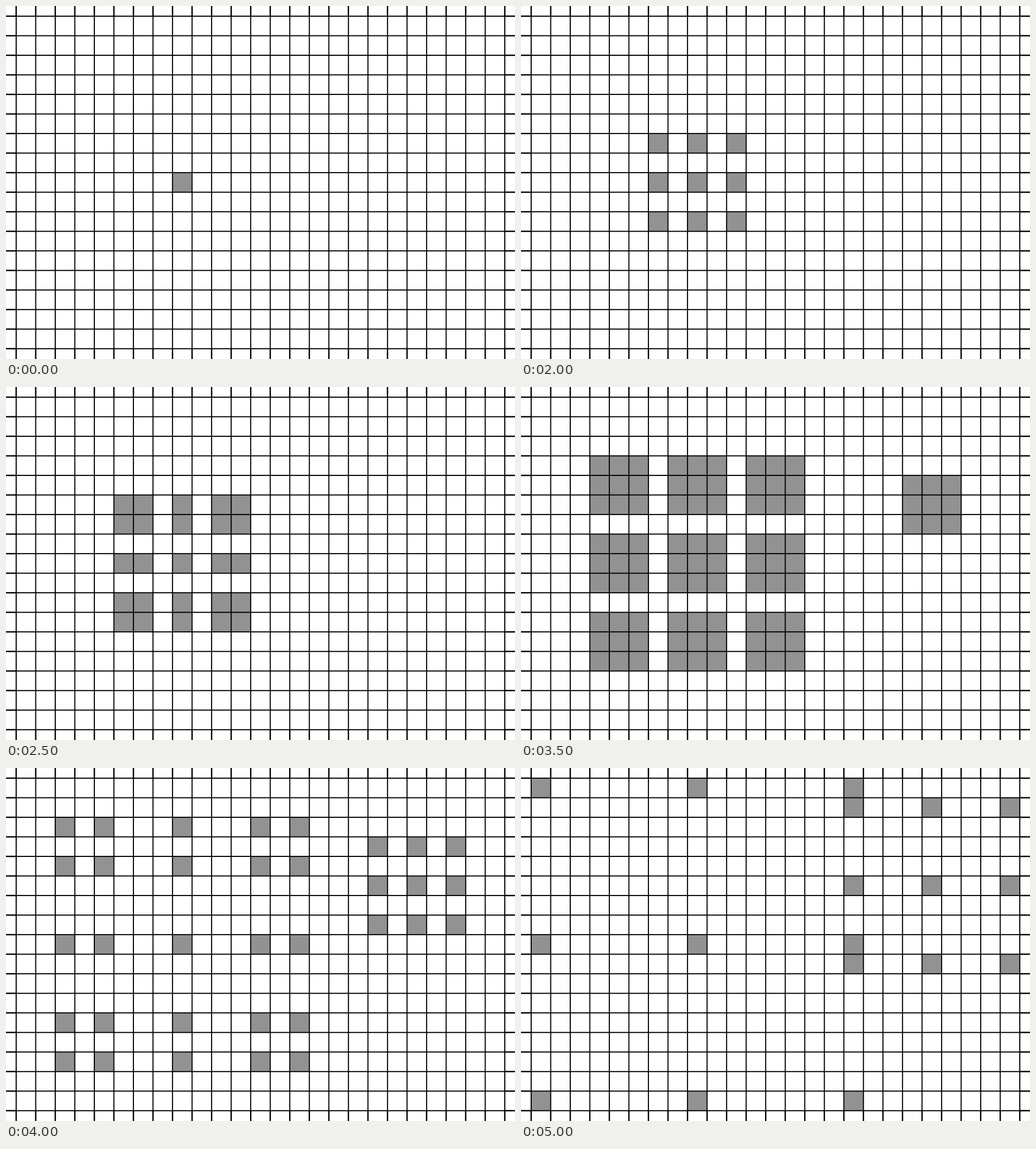
Recreate the animation shown at these times as an HTML page with a canvas. Size 899 by 623 pixels, loop 6.5 s.

```html
<!DOCTYPE html>
<html lang="en">
<head>
<meta charset="utf-8">
<title>Parity automaton</title>
<style>
html, body { margin: 0; width: 100%; height: 100%; overflow: hidden; background: #fff; }
canvas { display: block; }
</style>
</head>
<body>
<canvas id="stage" width="899" height="623"></canvas>
<script>
const ctx = document.getElementById("stage").getContext("2d");
const W = 899, H = 623, COLS = 25, ROWS = 17;
const LOOP = 6500, LAST = 8;
// Each seed: column, row and the generation in which it appears
const seeds = [[8, 8, 0], [20, 5, 4]];
const pos = i => 17.95 + 34.52 * i;

// Coefficients of (1 + x + x²)^n modulo 2
function parityRow(n) {
  let row = [1];
  for (let k = 0; k < n; k++) {
    const prev = row;
    row = Array.from({ length: prev.length + 2 },
      (_, i) => (prev[i] ^ prev[i - 1] ^ prev[i - 2]) & 1);
  }
  return row;
}

function alive(col, row, gen) {
  return seeds.reduce((sum, [x, y, born]) => {
    const age = gen - born;
    if (age < 0) return sum;
    const line = parityRow(age);
    return sum ^ (line[col - x + age] & line[row - y + age]);
  }, 0);
}

function rule(x, y, w, h) {
  ctx.fillRect(x, y, w, h);
}

function drawGrid() {
  const left = pos(0), right = pos(COLS), top = pos(0), bottom = pos(ROWS);
  const thin = 1.9, thick = 2.4;
  ctx.fillStyle = "#000";
  for (let i = 0; i <= COLS; i++) {
    const x = pos(i);
    rule(x - thin / 2, top, thin, bottom - top);
    rule(x - thick / 2, 0, thick, top);
    rule(x - thick / 2, bottom, thick, H - bottom);
  }
  for (let j = 0; j <= ROWS; j++) {
    const y = pos(j);
    rule(left, y - thin / 2, right - left, thin);
    rule(0, y - thick / 2, left, thick);
    rule(right, y - thick / 2, W - right, thick);
  }
}

function draw(gen) {
  ctx.fillStyle = "#fff";
  ctx.fillRect(0, 0, W, H);
  ctx.fillStyle = "#929292";
  for (let row = 0; row < ROWS; row++)
    for (let col = 0; col < COLS; col++)
      if (alive(col, row, gen)) ctx.fillRect(pos(col), pos(row), 34.52, 34.52);
  drawGrid();
}

const start = performance.now();
let shown = -1;
function tick() {
  const t = (performance.now() - start) % LOOP;
  const gen = Math.max(0, Math.min(LAST, Math.floor((t - 1000) / 500)));
  if (gen !== shown) draw(shown = gen);
  requestAnimationFrame(tick);
}
tick();
</script>
</body>
</html>
```
